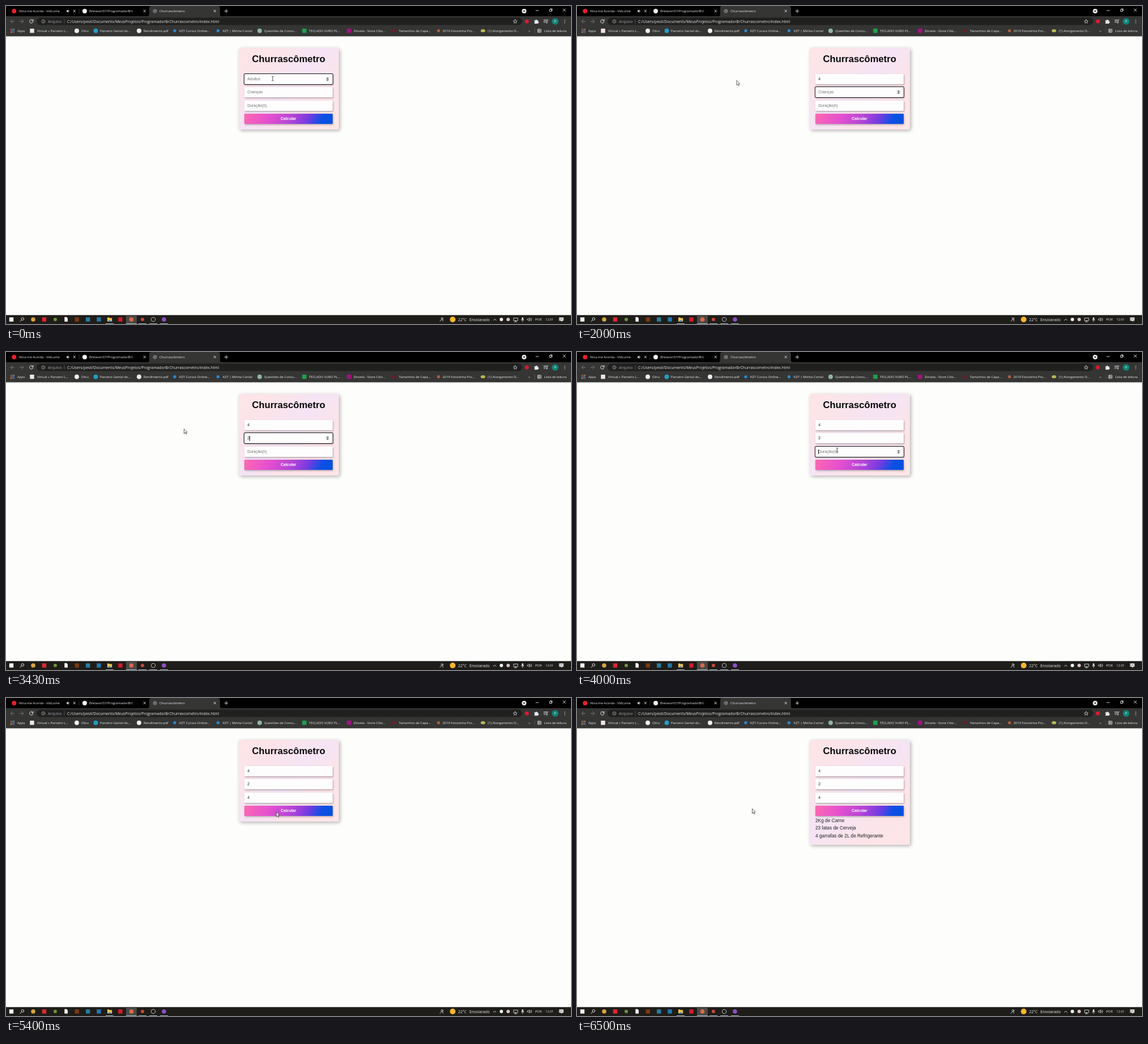
Write an HTML page that moves like this. It is 998x561 px and loops after 6.53 s.

```html
<!DOCTYPE html>
<html lang="pt-BR">
<head>
<meta charset="utf-8">
<title>Churrascômetro</title>
<style>
  html, body { margin: 0; width: 100%; height: 100%; overflow: hidden; background: #fdfdfb; }
  body { position: relative; font-family: "Liberation Sans", Arial, sans-serif; }
  body > * { position: absolute; }
  #chrome, #pointer { left: 0; top: 0; }
  #chrome text { font-family: "Open Sans", sans-serif; white-space: pre; }
  #card {
    left: 411px; top: 73.5px; width: 176.5px; height: 144.5px; border-radius: 4px;
    background: linear-gradient(135deg, #fde5e6, #fbe4ea 25%, #f5e4f5 48%, #fbe4ea 70%, #fde5e6);
    box-shadow: 2px 2px 6px rgba(0, 0, 0, .3);
  }
  #card.done { height: 185px; }
  h1 { margin: 0; left: 411px; top: 84px; width: 176.5px; text-align: center; font-size: 16.64px; line-height: 20px; color: #080808; }
  .field, button {
    left: 421px; width: 156px; height: 18.2px; box-sizing: border-box; border: 0; border-radius: 1px;
    font: 6.93px/18.2px "Liberation Sans", Arial, sans-serif; box-shadow: 1px 1.5px 3px rgba(0, 0, 0, .3);
  }
  .field { padding-left: 5.2px; background: #fdfdfd; color: #222; }
  .field.empty { color: #757575; }
  .field.focus { outline: 1.4px solid #101014; outline-offset: -.4px; }
  .caret { position: absolute; top: 5px; width: .8px; height: 8.4px; background: #111; visibility: hidden; }
  .spin { position: absolute; left: 143px; top: 5px; display: none; }
  .focus .spin { display: block; }
  button {
    top: 189.8px; padding: 0; font-weight: bold; color: #fff;
    background: linear-gradient(115deg, #fb69b0, #e650cf 28%, #b445d6 53%, #7b3be0 70%, #0c50e4 86%, #0450dc);
  }
  #result { left: 421px; top: 209.5px; font-size: 8.32px; line-height: 13.5px; color: #222; white-space: pre; visibility: hidden; }
</style>
</head>
<body>
<svg id="chrome" width="998" height="561" fill="none" stroke-linecap="round">
  <defs>
    <linearGradient id="fade"><stop offset="0" stop-opacity="0"/><stop offset="1"/></linearGradient>
  </defs>
  <path fill="#000" d="M0 0H998V19H0Z"/>
  <path fill="#353534" d="M0 18H250Q253 18 253 15V4Q253 0 257 0H374Q378 0 378 4V15Q378 18 381 18H998V53.5H0Z"/>
  <rect x="54" y="20.5" width="858" height="13" rx="6.5" fill="#20201f"/>
  <rect y="545.3" width="998" height="16" fill="#1f1d19"/>
  <rect x="212" y="545.3" width="19" height="16" fill="#4a4844"/>
  <g id="labels"></g>
  <path fill="url(#fade)" d="M84 3H99V15H84ZM224 3H239V15H224Z"/>
  <path fill="#000" d="M99 3H106V15H99ZM239 3H242V15H239Z"/>
  <g id="marks"></g>
  <!-- tab strip -->
  <g stroke="#e8eaed" stroke-width=".9">
    <path d="M119 7l3.6 3.6m0-3.6L119 10.6M243 7l3.6 3.6m0-3.6L243 10.6M367 7l3.6 3.6m0-3.6L367 10.6"/>
    <path d="M386.2 9h5.6M389 6.2v5.6M936 8h4.6M984 5l4.4 4.4m0-4.4L984 9.4M960.5 6h3.2v3.5h-3.2zM961.5 5h3.2v3.4"/>
    <path d="M107.3 8h1l1.6-1.4v4.8l-1.6-1.4h-1z" fill="#e8eaed" stroke-width=".3"/>
    <path d="M111 7.5q1.2 1.5 0 3" stroke-width=".6"/>
  </g>
  <path stroke="#555" stroke-width=".6" d="M129 5v8"/>
  <path fill="#111" d="M913 8h4.4l-2.2 2.6z"/>
  <circle cx="263" cy="9" r="3.5" fill="#77797c"/>
  <path stroke="#444" stroke-width=".6" d="M260 8q3-1 3 1t3 1.6M262 12v-2"/>
  <!-- toolbar -->
  <g stroke="#77787a" stroke-width="1">
    <path d="M14.5 27.2H8.2m3-3l-3 3 3 3M24.500 27.200h6.300m-3-3l3 3-3 3"/>
    <circle cx="65.800" cy="27.200" r="3" stroke="#b5b8bb" stroke-width=".7"/>
    <path d="M65.800 26.700v2M65.800 25.300v.1" stroke="#b5b8bb" stroke-width=".8"/>
    <path d="M103 23.500v7.500" stroke-width=".6"/>
  </g>
  <g stroke="#e8eaed" stroke-width="1">
    <path d="M47.300 25.300a3.100 3.100 0 1 0 .5 2.600M48 23.800v2.400h-2.400"/>
    <path d="M899.400 23.800l1 2.300 2.500.2-1.900 1.600.6 2.400-2.200-1.300-2.200 1.300.6-2.400-1.900-1.600 2.500-.2z" stroke-width=".7"/>
    <path d="M933.500 25.500h2a1.300 1.300 0 0 1 2.600 0h1.700v2a1.200 1.200 0 0 1 0 2.400v1h-6.300v-1.500a1.200 1.200 0 0 0 0-2.200z" fill="#e8eaed" stroke-width=".3"/>
    <path d="M950 24.500h5M950 26.700h5M950 28.900h3M956 29.500v-5h1.500" stroke-width=".8"/>
    <circle cx="955.200" cy="29.500" r=".9" fill="#e8eaed" stroke="none"/>
    <path d="M987 24.600v.1M987 27.200v.1M987 29.800v.1" stroke-width="1.300"/>
    <path d="M939.500 40.800h5.500v5.800h-5.500zM939.500 42.700h5.500M939.500 44.600h5.500M941.300 40.800v5.800" stroke-width=".7"/>
  </g>
  <path stroke="#666" stroke-width=".6" d="M934 39v9"/>
  <!-- taskbar -->
  <g stroke="#f0f0f0" stroke-width=".9">
    <circle cx="29.300" cy="552" r="2.300"/><path d="M27.500 553.800l-2.600 2.800"/>
    <circle cx="260" cy="553" r="3.700" stroke="#c9c9c9"/>
    <path d="M861 554.500l2.300-2.300 2.300 2.300"/>
    <circle cx="770" cy="551.300" r="1.500" stroke-width=".7"/>
    <path d="M766.500 556.500q1-3 3.500-3t2 3M771.800 550.500q1.500 1 0 2.500" stroke-width=".7"/>
    <path d="M897 550.500h7v4.500h-7zM898 557h4M900 555v2" stroke-width=".8"/>
    <path d="M912.500 550.500v2.500" stroke-width="2.400"/><path d="M910.300 553q0 2.300 2.200 2.300t2.200-2.300M912.500 555.500v1.500" stroke-width=".6"/>
    <path d="M921.300 552h1.200l2-1.700v5.400l-2-1.700h-1.200zM926 551.500q1.300 1.500 0 3M927.600 550.300q2.400 2.700 0 5.400" stroke-width=".7"/>
    <path d="M977.500 549.700h7v5.300h-2l-1.500 1.700v-1.700h-3.500z" fill="#f0f0f0" stroke-width=".5"/>
    <path d="M979 551.500h4M979 553.200h4" stroke="#333" stroke-width=".5"/>
  </g>
  <path fill="#f4f4f4" d="M103.300 548.800h3.700l2 2v6h-5.700z"/>
  <path fill="#f3c64c" d="M179 549.500h3l1 1h4.200v6H179z"/>
  <path fill="#4a9be0" d="M181 554h4.200v2.500H181z"/>
  <path fill="#a9bccb" d="M176 560h14v1h-14zM212 560h19v1h-19zM234 560h14v1h-14zM253 560h14v1h-14zM272 560h14v1h-14z"/>
</svg>

<div id="card"></div>
<h1>Churrascômetro</h1>
<button>Calcular</button>
<div id="result">2Kg de Carne
23 latas de Cerveja
4 garrafas de 2L de Refrigerante</div>

<svg id="pointer" width="998" height="561">
  <path id="arrow" d="M0 0V8.200L1.900 6.500 3.200 9.300 4.500 8.700 3.200 6 5.600 5.800Z" fill="#fff" stroke="#222" stroke-width=".7"/>
  <path id="beam" d="M-1.800-3.800H-.5L0-3.300 .5-3.800H1.800M0-3.300V3.300M-1.800 3.800H-.5L0 3.300 .5 3.800H1.800" fill="none" stroke="#222" stroke-width=".8"/>
</svg>

<script>
const $ = id => document.getElementById(id);

// Browser and taskbar labels: x, baseline, text, size, colour
const label = (x, y, text, size = 5.8, fill = "#e8eaed") =>
  `<text x="${x}" y="${y}" font-size="${size}" fill="${fill}">${text}</text>`;
const bookmarks = [
  [20, "Apps"], [55, "Virtual » Parceiro L..."], [133, "Olnu"], [166, "Parceiro Genial do..."],
  [243, "Rendimento.pdf"], [306, "KZT Cursos Online..."], [383, "KZT | Minha Conta!"],
  [456, "Questões de Concu..."], [535, "TECLADO VURO PL..."], [614, "Zinvela - Store Cilio..."],
  [694, "Tamanhos de Capa..."], [771, "2019 Fotovinha Pro..."], [851, "(1) Alongamento D..."],
  [923, "»"], [950.5, "Lista de leitura"]
];
$("labels").innerHTML =
  label(23, 11, "Nina me Acorda - VidLume") + label(147, 11, "Brelavon57/ProgramadorBrChurra") +
  label(271, 11, "Churrascômetro", 5.9) + label(74, 29.6, "Arquivo", 6.8, "#9aa0a6") +
  label(108, 29.6, "C:/Users/pesil/Documents/MeusProjetos/ProgramadorBrChurrascometro/index.html", 6.8) +
  bookmarks.map(([x, text]) => label(x, 45.7, text)).join("") +
  label(798.5, 555.8, "22°C", 6.9) + label(818.5, 555.8, "Ensolarado", 6.9) +
  label(934.5, 555.3, "POR", 6) + label(953, 555.3, "12:01", 5.6);

// Plain icons
const dot = (x, y, r, fill) => `<circle cx="${x}" cy="${y}" r="${r}" fill="${fill}"/>`;
const box = (x, y, s, fill) => `<rect x="${x - s / 2}" y="${y - s / 2}" width="${s}" height="${s}" fill="${fill}"/>`;
const row = (shape, y, size, items) => items.map(([x, fill]) => shape(x, y, size, fill)).join("");
let grid = "";
for (let i = 0; i < 9; i++)
  grid += box(8.7 + i % 3 * 2.6, 41.2 + Math.floor(i / 3) * 2.6, 1.7, ["#e8584a", "#f0b93c", "#4c9bea"][(i * 2 + (i > 4)) % 3]);
$("marks").innerHTML = grid +
  row(dot, 9, 4, [[14.3, "#e8202a"], [139, "#f2f2f2"], [915.2, "#f2f2f2"]]) +
  dot(920, 27.2, 3.4, "#e0182c") + dot(970, 27.2, 5.8, "#0f8578") + label(968.3, 29.3, "P", 5.8, "#fff") +
  row(dot, 43.7, 4, [[125, "#eceff1"], [158.5, "#239fc4"], [235, "#eceff1"], [448, "#8fb5a0"]]) +
  row(box, 43.7, 7.5, [[46, "#f0e6e2"], [527, "#1fa04c"], [606, "#a3127f"]]) +
  row(dot, 43.7, 2.6, [[298, "#2a8ad4"], [374.5, "#2a8ad4"], [685, "#7d1820"], [764, "#b0603a"]]) +
  `<ellipse cx="842.5" cy="43.7" rx="4" ry="2.6" fill="#b9b957"/>` +
  row(box, 553, 7.4, [[9.5, "#f4f4f4"], [67.5, "#e02734"], [125.300, "#7c3a12"], [144.700, "#2b7c9e"], [164, "#2477ac"], [202, "#d31c2a"]]) +
  row(dot, 553, 3.8, [[48, "#d8a540"], [221.500, "#d8694f"], [279, "#8f4fc8"]]) +
  row(dot, 553, 3, [[87, "#6e9440"], [241, "#c8483c"], [875, "#f0f0f0"], [887, "#d8c8c8"]]) +
  dot(789, 553, 5, "#f5b62e");

// Form fields: placeholder, typed value, time of typing
const inputs = [["Adultos", 4, 400], ["Crianças", 2, 3000], ["Duração(h)", 4, 4600]].map(([hint, value, typed], i) => {
  const el = document.createElement("div");
  el.style.top = 119.8 + 23.35 * i + "px";
  el.innerHTML = `<span></span><i class="caret"></i>
    <svg class="spin" width="8" height="8"><rect width="8" height="8" fill="#efefef"/>
    <path d="M1.800 3.300L4 .9 6.200 3.300ZM1.800 4.700H6.200L4 7.100Z" fill="#444"/></svg>`;
  document.body.insertBefore(el, $("pointer"));
  return { el, hint, value, typed, text: el.firstChild, caret: el.querySelector(".caret") };
});

const LOOP = 6530, BLUR = 5330, CALCULATED = 5480;
const focusTimes = [-500, 1450, 4000];
const caretResets = [...focusTimes, ...inputs.map(f => f.typed)];

// Pointer path: time, x, y
const path = [
  [0, 471, 128], [1370, 471, 128], [1430, 470, 150], [1500, 470, 150], [1960, 282, 131.300],
  [2030, 282, 131.300], [2620, 314.500, 135.700], [3440, 314.500, 135.700], [3950, 459.500, 173],
  [4830, 459.500, 173], [5150, 477.500, 201], [5500, 477.500, 201], [5950, 309.500, 195.300], [LOOP, 309.500, 195.300]
];
function pointerAt(t) {
  const n = path.findIndex(p => p[0] > t);
  const [t0, x0, y0] = path[n - 1], [t1, x1, y1] = path[n];
  const u = (t - t0) / (t1 - t0), e = u * u * (3 - 2 * u);
  return [x0 + (x1 - x0) * e, y0 + (y1 - y0) * e];
}

function draw(t) {
  const focused = t < BLUR ? focusTimes.filter(f => f <= t).length - 1 : -1;
  const blink = t - Math.max(...caretResets.filter(r => r <= t));
  inputs.forEach((f, i) => {
    const empty = t < f.typed;
    f.el.className = "field" + (empty ? " empty" : "") + (i === focused ? " focus" : "");
    f.text.textContent = empty ? f.hint : f.value;
    f.caret.style.left = empty ? "5px" : "9.2px";
    f.caret.style.visibility = i === focused && blink % 1000 < 500 ? "visible" : "hidden";
  });

  const done = t >= CALCULATED;
  $("card").className = done ? "done" : "";
  $("result").style.visibility = done ? "visible" : "hidden";

  const [x, y] = pointerAt(t);
  const row = (y - 119.8) / 23.35;
  const overField = x > 421 && x < 577 && row > 0 && row < 3 && row % 1 < .78;
  $("pointer").firstElementChild.style.display = overField ? "none" : "";
  $("beam").style.display = overField ? "" : "none";
  for (const id of ["arrow", "beam"]) $(id).setAttribute("transform", `translate(${x} ${y})`);
}

const start = performance.now();
function tick() {
  draw((performance.now() - start) % LOOP);
  requestAnimationFrame(tick);
}
tick();
</script>
</body>
</html>
```
